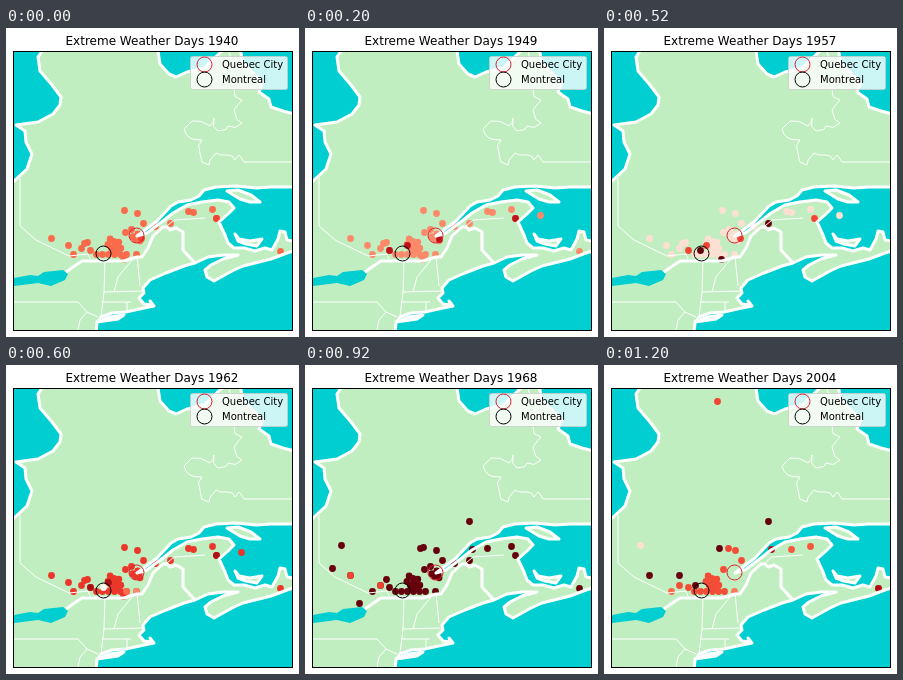
Animation, 293 px wide and 309 px high, one loop 1400 ms. Source, as an HTML page with a canvas:

```html
<!DOCTYPE html>
<html lang="en">
<head>
<meta charset="utf-8">
<title>Extreme Weather Days</title>
<style>
  html, body { margin: 0; width: 100%; height: 100%; overflow: hidden; background: #fff; }
  canvas { display: block; }
</style>
</head>
<body>
<canvas id="map" width="293" height="309"></canvas>
<script>
const ctx = document.getElementById('map').getContext('2d');
const SEA = '#00ced1', LAND = '#c1eec1', RED = '#dc2030';
const STEP = 200;

function seeded(seed) {
  return () => {
    seed = (seed * 16807) % 2147483647;
    return seed / 2147483647;
  };
}

const points = list => list.split(' ').map(p => p.split(',').map(Number));

// Breaks every long segment at a slightly displaced midpoint
function roughen(line, amount) {
  const rand = seeded(77);
  return line.flatMap(([x, y], i) => {
    const [nx, ny] = line[i + 1] || [x, y];
    const len = Math.hypot(nx - x, ny - y);
    if (len < 5 || len > 30) return [[x, y]];
    const shift = () => (rand() - 0.5) * amount;
    return [[x, y], [(x + nx) / 2 + shift(), (y + ny) / 2 + shift()]];
  });
}

function toPath(line, closed) {
  const path = new Path2D();
  line.forEach(([x, y]) => path.lineTo(x, y));
  if (closed) path.closePath();
  return path;
}

const area = list => toPath(points(list), true);
const line = list => toPath(points(list));

const northShore = '300,159 265,159 250,160 230,158 210,159 198,162 193,168 185,172 172,174 165,178 151,193 131,208';
const southShore = '141,205 157,193 167,185 181,177 196,174 212,172 223,174 228,180 222,186 213,194 219,207 222,215';
const strait = '228,220 238,220 249,223 259,220 266,222 272,211 274,203 279,204 281,212 300,215';
const novaScotia = '300,219 281,225 265,231 237,238 226,243 208,253 201,249 199,242 205,237 217,231 232,227 217,227';
const newEngland = '202,229 189,235 178,238 160,245 144,252 137,260 138,265 133,270 138,276 146,277 144,273 148,278 ' +
  '138,280 120,284 106,285 95,289 91,295 89,315 300,315';

// Water areas close outside the visible box
const seas = [
  '36,10 36,23 32,29 34,43 46,57 55,69 54,77 47,86 32,94 10,97 19,103 20,114 26,126 21,141 7,154 -5,154 -5,10',
  '152,10 152,23 154,36 163,46 170,49 181,44 198,40 216,23 216,10',
  '232,10 237,35 257,55 253,64 263,71 265,79 277,83 300,89 300,10',
  [northShore, southShore, strait].join(' '),
  [novaScotia, newEngland].join(' ')
].map(area);
const isles = [
  '221,163 232,162 245,167 254,174 244,174 234,171',
  '229,206 233,211 244,213 256,211 251,218 240,216 232,213',
  '91,294 104,289 118,287 112,291'
].map(area);
const lake = area('8,250 24,247 32,248 38,244 57,242 62,246 59,252 45,258 32,255 8,258');
const border = line('60,244 67,239 76,233 118,233 131,229 136,229 142,220 147,208 157,199 161,199 164,202 ' +
  '170,200 177,204 177,222 189,235');
const provinces = [
  '14,150 14,198 30,212 63,228 82,226 84,231',
  '161,198 168,192 199,190',
  '99,233 98,264 95,289',
  '126,232 112,249 108,264',
  '131,228 134,258',
  '98,264 137,263',
  '96,274 125,274',
  '121,274 121,283',
  '7,274 72,274 81,284 92,289',
  '81,284 74,292 72,302'
].map(line);
const labrador = toPath(roughen(points('223,23 232,40 228,61 236,72 228,82 236,95 222,98 212,103 208,90 204,98 186,93 178,101 ' +
  '184,110 196,112 194,125 203,137 210,125 222,127 229,132 233,127 238,134 286,134'), 6));

// Points spiralling out from a centre
const cluster = (cx, cy, n, radius) => Array.from({ length: n }, (_, i) => {
  const r = radius * Math.sqrt((i + 0.5) / n), a = i * 2.4;
  return [cx + r * Math.cos(a), cy + r * Math.sin(a)];
});

const groups = {
  valley: [
    ...Array.from({ length: 6 }, (_, i) => [90 + 6 * i, 226]),
    ...cluster(107, 217, 9, 8)
  ],
  quebec: cluster(131, 209, 5, 5),
  west: points('45,210 67,226 75,220 81,214 84,222'),
  early: points('62,217 78,215 187,184 117,231'),
  north: points('118,182 131,185 137,195 125,201 119,204 130,226'),
  coast: points('149,198 164,195 182,183 206,181 210,190'),
  cape: points('274,223'),
  remote: points('27,203 36,180 54,238 164,156 167,184 115,183')
};

// level: common intensity, spread: variation between stations, marks: [x, y, level]
const home = 'valley quebec west north coast cape';
const years = [
  { year: 1940, level: 0.5, on: home + ' early', marks: [[210, 190, 0.6], [135, 210, 0.6]] },
  { year: 1949, level: 0.4, on: home + ' early',
    marks: [[84, 222, 0.8], [102, 217, 0.8], [134, 211, 0.8], [210, 190, 0.8], [235, 187, 0.4]] },
  { year: 1957, level: 0.125, on: 'valley quebec west north coast early',
    marks: [[96, 222, 1], [117, 231, 1], [164, 195, 1], [84, 222, 0.6], [102, 217, 0.6], [136, 210, 0.6],
      [210, 190, 0.6], [235, 187, 0.125]] },
  { year: 1962, level: 0.64, on: home + ' early',
    marks: [[210, 190, 0.85], [102, 217, 0.85], [84, 222, 0.85], [130, 226, 0.4], [120, 226, 0.5],
      [97, 222, 0], [235, 187, 0.64]] },
  { year: 1968, level: 1, on: home + ' remote', marks: [[45, 210, 0.6], [75, 220, 0.6]] },
  { year: 1984, level: 0.9, spread: 0.2, on: home + ' remote' },
  { year: 2004, level: 0.58, on: 'valley cape',
    marks: [[113, 36, 0.6], [124, 183, 0.6], [131, 185, 0.58], [137, 195, 0.58], [119, 204, 0.58], [130, 226, 0.45],
      [67, 226, 0.5], [75, 220, 0.58], [84, 222, 0.58], [187, 184, 0.55], [206, 181, 0.55], [167, 184, 0.85],
      [274, 223, 0.85], [36, 180, 0.125], [45, 210, 1], [75, 210, 1], [91, 220, 1], [115, 183, 1], [164, 156, 1]] }
];

const ramp = ['fff5f0', 'fee0d2', 'fcbba1', 'fc9272', 'fb6a4a', 'ef3b2c', 'cb181d', 'a50f15', '67000d'];

function reds(level) {
  const pos = Math.min(Math.max(level, 0), 1) * (ramp.length - 1);
  const i = Math.min(Math.floor(pos), ramp.length - 2);
  const channel = (k, c) => parseInt(ramp[k].slice(c, c + 2), 16);
  const mix = [0, 2, 4].map(c => Math.round(channel(i, c) + (channel(i + 1, c) - channel(i, c)) * (pos - i)));
  return `rgb(${mix})`;
}

function fill(path, color) {
  ctx.fillStyle = color;
  ctx.fill(path);
}

function stroke(path, color, width) {
  ctx.strokeStyle = color;
  ctx.lineWidth = width;
  ctx.stroke(path);
}

function disc(x, y, r) {
  const path = new Path2D();
  path.arc(x, y, r, 0, Math.PI * 2);
  return path;
}

function text(str, x, y, size, align) {
  ctx.font = size + 'px "DejaVu Sans", sans-serif';
  ctx.textAlign = align;
  ctx.fillStyle = '#000';
  ctx.fillText(str, x, y);
}

function drawLand() {
  ctx.fillStyle = LAND;
  ctx.fillRect(7, 23, 280, 280);
  seas.forEach(p => fill(p, SEA));
  isles.forEach(p => fill(p, LAND));
  fill(lake, SEA);
}

function drawStations({ level, spread = 0, on, marks = [] }) {
  const rand = seeded(1984);
  const dot = (x, y, v) => fill(disc(x + 0.5, y + 0.5, 3.4), reds(v));
  on.split(' ').flatMap(name => groups[name])
    .forEach(([x, y]) => dot(x, y, level + (rand() < 0.5 ? -spread : spread) / 2));
  marks.forEach(m => dot(...m));
}

function drawLines() {
  ctx.lineJoin = 'round';
  [...seas, ...isles, border].forEach(p => stroke(p, '#fff', 3));
  [...provinces, labrador].forEach(p => stroke(p, '#fff', 1));
}

function drawLegend() {
  const box = new Path2D();
  box.roundRect(184.5, 28.5, 97, 33, 2);
  fill(box, 'rgba(255,255,255,.8)');
  stroke(box, 'rgba(204,204,204,.8)', 1);
  [['Quebec City', RED], ['Montreal', '#000']].forEach(([name, color], i) => {
    stroke(disc(198.5, 36.5 + 15 * i, 7.5), color, 1);
    text(name, 216, 40 + 15 * i, 10, 'left');
  });
}

function draw(season) {
  ctx.fillStyle = '#fff';
  ctx.fillRect(0, 0, 293, 309);

  ctx.save();
  ctx.beginPath();
  ctx.rect(7, 23, 280, 280);
  ctx.clip();
  drawLand();
  drawStations(season);
  drawLines();
  stroke(disc(130.5, 207.5, 7.5), RED, 1);
  stroke(disc(97.5, 225.5, 7.5), '#000', 1);
  drawLegend();
  ctx.restore();

  ctx.strokeStyle = '#000';
  ctx.lineWidth = 1;
  ctx.strokeRect(7.5, 23.5, 279, 279);
  text('Extreme Weather Days ' + season.year, 146, 17, 12, 'center');
}

let shown = -1;
function tick() {
  const i = Math.floor(performance.now() / STEP) % years.length;
  if (i !== shown) draw(years[shown = i]);
  requestAnimationFrame(tick);
}
tick();
</script>
</body>
</html>
```
